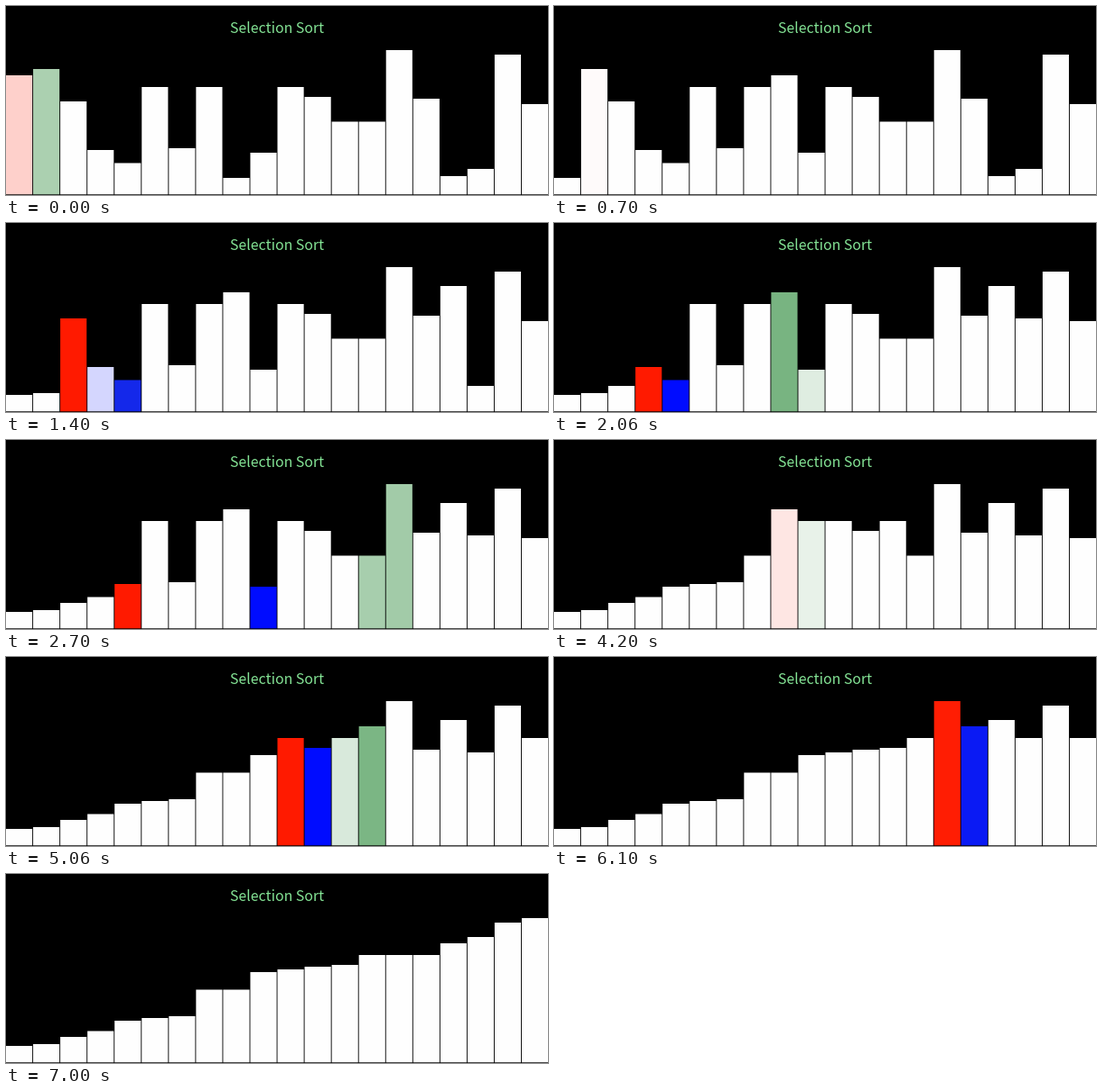
A matplotlib script for the animation above (7.2 s loop, 600 px wide and 210 px high).

```python
import matplotlib.pyplot as plt
import numpy as np
from matplotlib.animation import FuncAnimation

WIDTH, HEIGHT, DPI = 600, 210, 100
LOOP_MS, TICK_MS = 7200, 10
PITCH, BAR_WIDTH, FLOOR = 30.05, 29.15, 209.3

# Timing in ms
SCAN_START, FIRST_LAG = -11, 59
COMPARE, UPDATE, SWAP = 29.7, 14, 28

WHITE, GREEN, RED, BLUE = (
    np.array(c) / 255
    for c in [(254, 254, 254), (120, 180, 129), (255, 26, 0), (0, 12, 255)]
)
TITLE = (131 / 255, 226 / 255, 148 / 255)

TOPS = [77, 70, 106, 160, 174.5, 90, 158, 90, 191, 163,
        90, 101, 128.5, 128.5, 49, 103, 189, 181, 54, 109]


def clamp(x):
    return min(max(x, 0.0), 1.0)


def mix(a, b, amount):
    return a + (b - a) * amount


def plan_sort(tops):
    """Selection sort as a list of timed passes."""
    tops, clock, passes = list(tops), SCAN_START, []
    for i in range(len(tops) - 1):
        start, before, best = clock, list(tops), i
        scans, minima = [], []
        for j in range(i + 1, len(tops)):
            begin = clock
            clock += COMPARE + (FIRST_LAG if not scans else 0) * (i == 0)
            if tops[j] > tops[best]:
                best = j
                minima.append((j, clock))
                clock += UPDATE
            scans.append((j, begin, clock))
        tops[i], tops[best] = tops[best], tops[i]
        passes.append(dict(index=i, start=start, end=clock, before=before,
                           after=list(tops), scans=scans, minima=minima))
        clock += SWAP
    return passes


PASSES = plan_sort(TOPS)


def scan_glow(t, begin, end):
    rise = np.sin(np.pi / 2 * clamp(((t - begin) / COMPARE - 0.2) / 0.4))
    fall = (1 - clamp(((t - end) / COMPARE - 0.3) / 0.7)) ** 3
    return rise * fall


def state_at(t):
    current = [p for p in PASSES if p["start"] <= t][-1]
    colors = [WHITE] * len(TOPS)
    keep = 1 - clamp((t - current["end"]) / (SWAP / 2))

    for j, begin, end in current["scans"]:
        if t > begin:
            colors[j] = mix(WHITE, GREEN, scan_glow(t, begin, end) * keep)

    minima = current["minima"]
    for n, (j, found) in enumerate(minima):
        amount = clamp((t - found) / UPDATE)
        if n + 1 < len(minima):
            amount -= clamp((t - minima[n + 1][1]) / UPDATE)
        colors[j] = mix(colors[j], BLUE, amount * keep)

    red = clamp((t - current["start"] - 3) / 40) * keep
    colors[current["index"]] = mix(WHITE, RED, red)
    swapped = t >= current["end"] + SWAP / 2
    return current["after" if swapped else "before"], colors


fig = plt.figure(figsize=(WIDTH / DPI, HEIGHT / DPI), dpi=DPI, facecolor="black")
ax = fig.add_axes([0, 0, 1, 1])
ax.set(xlim=(0, WIDTH), ylim=(HEIGHT, 0))
ax.axis("off")

bars = [
    ax.add_patch(plt.Rectangle((i * PITCH, top), BAR_WIDTH, FLOOR - top,
                               linewidth=0, snap=False))
    for i, top in enumerate(TOPS)
]
ax.text(300.3, 30, "Selection Sort", color=TITLE, ha="center", va="baseline",
        family="Noto Sans CJK JP", fontsize=15.9 * 72 / DPI)


def draw(frame):
    # The picture advances 30 times a second, on 10 ms boundaries.
    step = (3 * frame + 2) // 10
    tops, colors = state_at(10 * step // 3 * TICK_MS)
    for bar, top, color in zip(bars, tops, colors):
        bar.set_y(top)
        bar.set_height(FLOOR - top)
        bar.set_facecolor(np.clip(color, 0, 1))
    return bars


animation = FuncAnimation(fig, draw, frames=LOOP_MS // TICK_MS,
                          interval=TICK_MS, repeat=True, repeat_delay=0)
plt.show()
```
